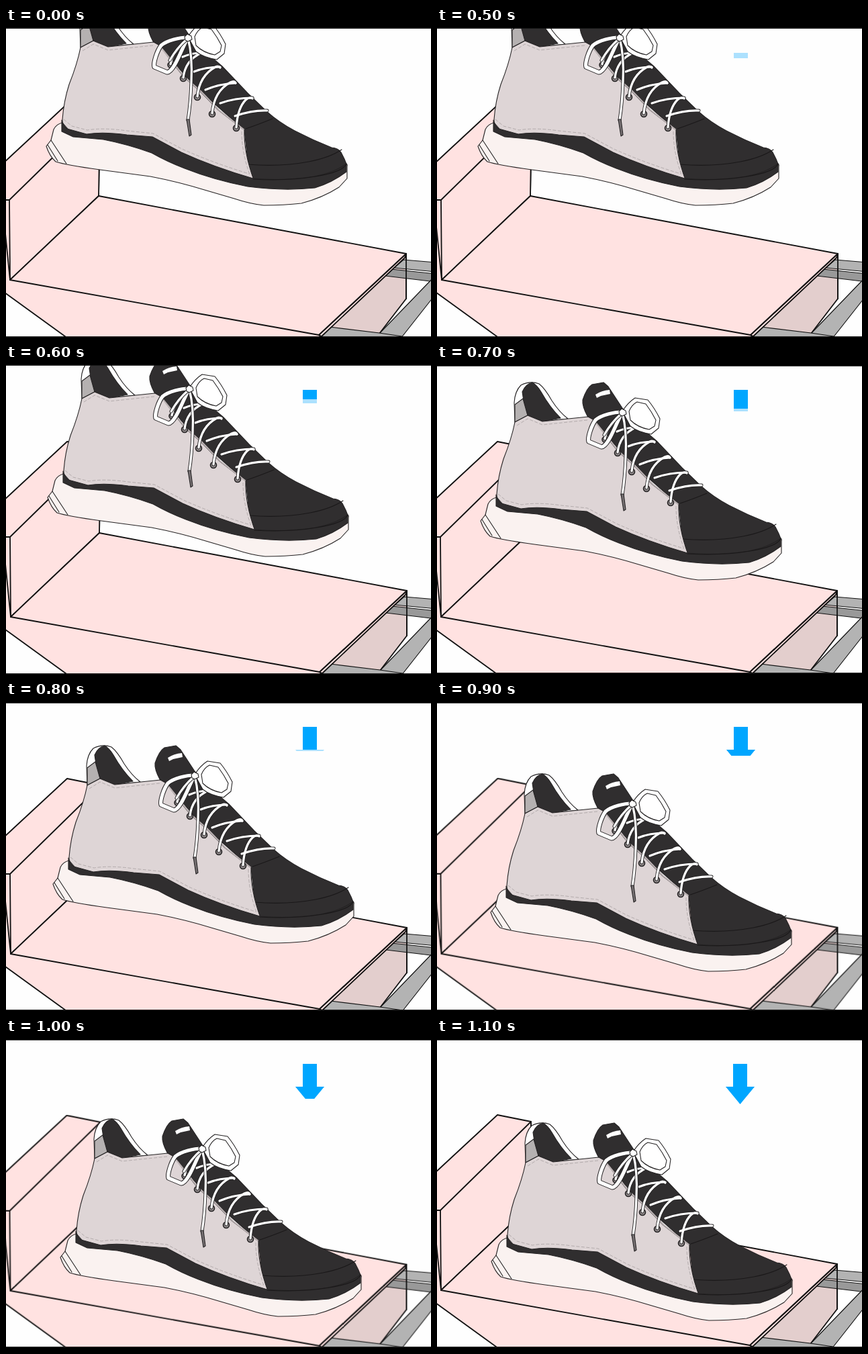
These frames come from a looping animation (633 by 460 pixels, 2.5 s). An HTML page:

```html
<!DOCTYPE html>
<html lang="en">
<head>
<meta charset="utf-8">
<title>Shoe lowered onto a foot measure</title>
<style>
html, body { margin: 0; width: 100%; height: 100%; overflow: hidden; background: #fefefe; }
.stage { position: relative; width: 633px; height: 460px; overflow: hidden; }
.scene { position: absolute; left: 0; top: 0; display: block; }

#box, #shoe, .wipe, .frame { animation: 2500ms step-end infinite; }
#box { animation-name: drift; }
#shoe { animation-name: lower; }
.wipe { position: absolute; left: 431px; top: 37px; width: 44px; overflow: hidden; }
.wipe svg { display: block; }
.pale { opacity: .32; animation-name: pale; }
.solid { animation-name: solid; }
.frame { position: absolute; inset: 0; box-sizing: border-box; border: 0 solid #111; animation-name: frame; }

@keyframes drift {
  0%, 28% { transform: translate(0, 0); }
  20%, 32% { transform: translate(1px, 0); }
  36% { transform: translate(.5px, -.3px); }
  44%, 100% { transform: translate(0, -1px); }
}
@keyframes lower {
  0% { transform: translate(-21px, -155px); }
  20% { transform: translate(-20px, -155px); }
  24% { transform: translate(-19px, -134px); }
  28% { transform: translate(-16px, -99px); }
  32% { transform: translate(-11px, -60px); }
  36% { transform: translate(-1px, -18px); }
  40% { transform: translate(0, -6px); }
  44%, 100% { transform: translate(0, 0); }
}
@keyframes pale {
  0% { height: 0; }
  20% { height: 8px; }
  24% { height: 20px; }
  28% { height: 32px; }
  32% { height: 36px; }
  36% { height: 43px; }
  40% { height: 52px; }
  44%, 100% { height: 60px; left: 430px; }
}
@keyframes solid {
  0%, 20% { height: 0; }
  24% { height: 14px; }
  28% { height: 28px; }
  32% { height: 34px; }
  36% { height: 43px; }
  40% { height: 52px; }
  44%, 100% { height: 60px; left: 430px; }
}
@keyframes frame {
  0% { border-width: 1px 0; }
  28%, 100% { border-width: 2px 0; }
}

#box { stroke: #111; stroke-width: 1.8; stroke-linejoin: round; stroke-linecap: round; }
#shoe { stroke: #252324; stroke-width: 1.1; stroke-linejoin: round; stroke-linecap: round; }
.pink { fill: #ffe2e1; }
.shade { fill: #e3cecd; }
.steel { fill: #b3b3b3; stroke-width: 1.2; }
.steel.dark { fill: #999; }
.white { fill: #fff; }
.black { fill: #302e2f; }
.grey { fill: #ded5d6; }
.tab { fill: #b5b1b1; }
.sole { fill: #faf2f0; }
.line { fill: none; }
.seam { fill: none; stroke: #1a1819; }
.trim { fill: none; stroke: #bdb4b5; stroke-width: 2; }
.stitch { fill: none; stroke: #b3abac; stroke-width: 1; stroke-dasharray: 5 2.5; stroke-linecap: butt; }
.edge { fill: none; stroke: #252324; stroke-width: 5; }
.core { fill: none; stroke: #fff; stroke-width: 3.2; }
.bow .edge { stroke-width: 7.2; }
.bow .core { stroke-width: 5.2; }
</style>
</head>
<body>
<div class="stage">
<svg class="scene" width="633" height="460" viewBox="0 0 633 460">
  <defs>
    <g id="laces">
      <path d="M266 209Q268 193 284 181"/>
      <path d="M284 198Q298 192 312 192"/>
      <path d="M285 229Q288 203 312 192"/>
      <path d="M301 220Q318 213 340 213"/>
      <path d="M306 257Q309 226 333 213Q337 211 340 214"/>
      <path d="M318 247Q339 238 363 237"/>
      <path d="M328 282Q331 249 355 236Q361 233 363 237"/>
      <path d="M340 267Q362 259 388 259"/>
      <path d="M364 303Q366 274 378 262Q383 257 388 260"/>
      <path d="M362 286Q389 277 410 278"/>
    </g>
    <g id="ends">
      <path d="M292 170Q299 197 297 235Q296 267 292 292"/>
      <path d="M290 172Q276 184 265 203"/>
    </g>
    <g id="loops">
      <path d="M291 169C281 169 261 173 252 181C246 189 240 207 242 213L261 221C271 220 281 190 291 171"/>
    </g>
  </defs>

  <g id="box">
    <!-- heel block and outer side -->
    <path class="pink" d="M-6 203L90 114L140 124L138 250L466 457L490 475L110 475L-6 391Z"/>
    <path class="pink" d="M-6 256L5 256L140 124L138 250L6 375Z"/>
    <path class="line" d="M5 256L6 375"/>
    <!-- end opening and rails -->
    <path class="shade" d="M596 337L596 403L556 455L478 446Z"/>
    <path class="white" stroke="none" d="M597 374H634L597 410Z"/>
    <path class="steel" d="M592 345L640 349V363L578 357Z"/>
    <path class="steel dark" d="M574 359L640 366V378L565 369Z"/>
    <path class="steel" d="M640 368L556 455L588 462L640 396Z"/>
    <path class="steel" d="M482 445L556 454L590 459L588 466H460Z"/>
    <path class="line" d="M596 337V403"/>
    <!-- floor plate -->
    <path class="pink" d="M138 250L596 336L594 342L470 459L466 457L6 375Z"/>
    <path class="line" stroke-width="2.2" d="M596 336L466 457"/>
  </g>

  <g id="shoe">
    <!-- collar, lining and heel tab -->
    <path class="white" d="M132 184L131 155Q132 138 141 129Q155 122 168 127Q177 134 187 152Q198 169 211 179L174 183Z"/>
    <path class="black" d="M143 139Q148 127 158 125Q165 129 171 139Q184 162 200 178L174 183L151 174L146 159Z"/>
    <path class="tab" d="M132 158L144 149L151 174L132 184Z"/>

    <!-- tongue, vamp and toe -->
    <path class="black" d="M250 182L240 175Q232 160 233 151Q239 133 247 128L264 125L271 131L292 163L316 189L343 212L381 252L409 279Q428 296 451 308Q478 322 506 333Q516 334 520 340L525 350L529 360L510 384L420 392L384 380L376 307L300 240Z"/>
    <path class="white" stroke="none" d="M252 143Q261 137 273 136L274 142L260 145L254 148Z"/>
    <path class="seam" d="M381 358Q430 362 472 354Q503 348 521 336M378 305Q396 299 418 290"/>

    <!-- quarter -->
    <path class="grey" d="M132 184L151 174L173 183L241 176L250 181L267 204L285 227L310 249L337 277L376 307Q375 340 390 381L330 366L282 347L238 320L160 316L115 314L105 306V291Q107 264 115 239Q127 209 132 184Z"/>
    <path class="trim" d="M251 183L268 204L286 227L311 249L338 277L375 306"/>
    <path class="stitch" d="M135 189L151 179L173 188L240 181M372 309Q372 340 384 373"/>

    <!-- outsole and midsole -->
    <path class="sole" d="M105 296Q96 298 92 306L88 322L81 331Q86 346 95 354Q110 359 161 366L236 376Q278 384 320 397L361 409Q385 417 405 419Q435 419 461 416Q492 408 517 392L529 379V358L480 383L380 380L238 330L120 313Z"/>
    <path class="line" d="M88 322L111 357M83 329L98 353"/>
    <path class="black" d="M104 292Q106 300 112 305L141 313Q165 309 201 314L239 317L282 340Q330 362 389 379Q434 383 480 376Q511 370 528 357V369Q507 385 481 393Q434 398 381 391Q330 381 287 364Q261 354 238 341Q202 328 166 321L121 317L104 309Z"/>
    <path class="seam" d="M389 380Q440 383 482 376T528 357"/>
    <path class="stitch" d="M107 291L119 301L142 307Q166 303 201 308L240 312L283 335Q330 356 383 372"/>

    <!-- eyelets -->
    <g fill="#8f898a" stroke-width="1.6">
      <circle cx="266" cy="210" r="4"/>
      <circle cx="285" cy="230" r="4.5"/>
      <circle cx="306" cy="258" r="4.5"/>
      <circle cx="328" cy="283" r="4.5"/>
      <circle cx="364" cy="304" r="4.5"/>
    </g>

    <use href="#laces" class="edge"/>
    <use href="#laces" class="core"/>

    <!-- bow -->
    <g class="bow">
      <use href="#loops" class="edge"/>
      <use href="#loops" class="core"/>
    </g>
    <path class="white" d="M292 168Q300 155 311 148L330 151Q340 163 348 179L346 193L335 202Q315 199 304 190Z"/>
    <path class="white" d="M302 168Q306 158 314 154L327 157Q336 169 342 181L340 190L332 195Q315 192 304 181Z"/>
    <use href="#ends" class="edge"/>
    <use href="#ends" class="core"/>
    <path d="M290 291L294 291L297 314L294 316Z" fill="#777173"/>
    <path class="white" d="M287 168L291 164L297 167L298 172L292 175L288 173Z"/>
  </g>
</svg>

<div class="wipe pale"><svg width="44" height="60"><path fill="#00a6ff" d="M11 0H32V34H43L21.5 60L0 34H11Z"/></svg></div>
<div class="wipe solid"><svg width="44" height="60"><path fill="#00a6ff" d="M11 0H32V34H43L21.5 60L0 34H11Z"/></svg></div>
<div class="frame"></div>
</div>
</body>
</html>
```
